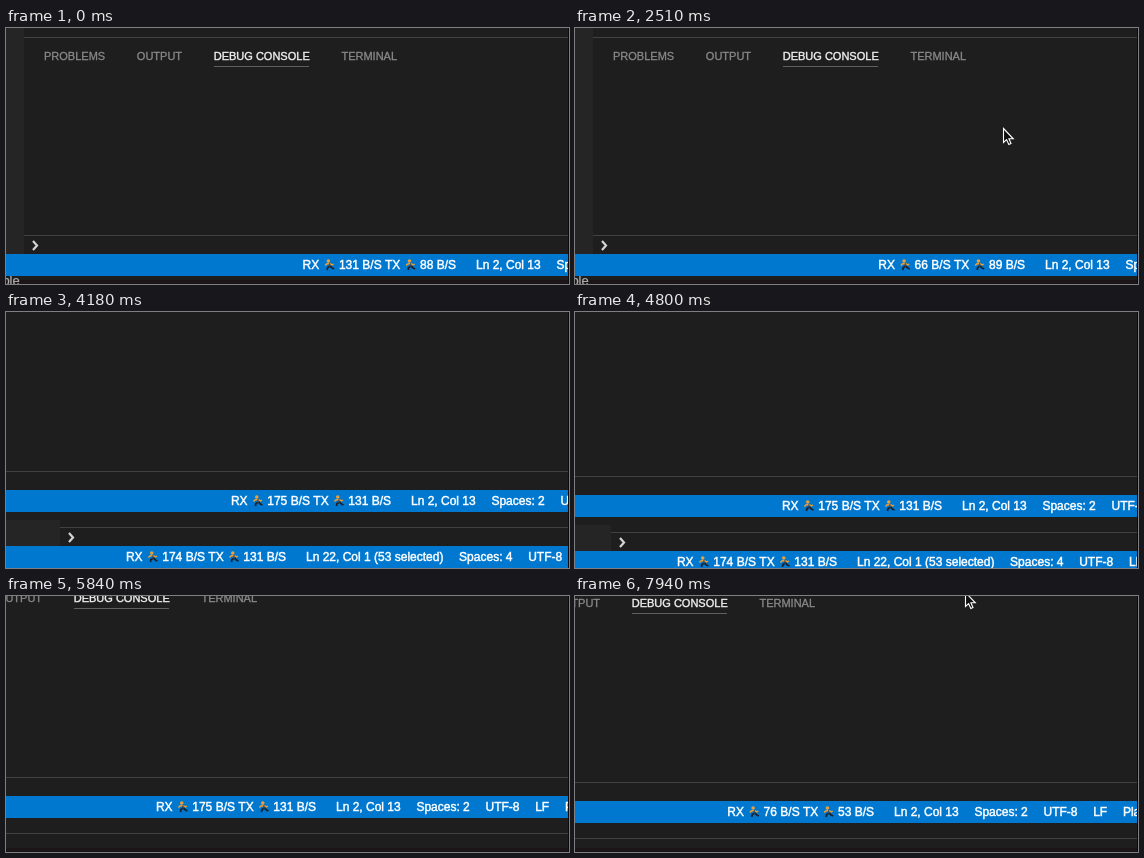
An HTML page with a canvas for the animation above (8 s loop, 563x256 px).

```html
<!DOCTYPE html>
<html lang="en">
<head>
<meta charset="utf-8">
<title>Network status bar</title>
<style>
  html, body { margin: 0; width: 100%; height: 100%; overflow: hidden; background: #1e1e1e; }
  canvas { display: block; }
</style>
</head>
<body>
<canvas id="stage" width="563" height="256"></canvas>
<script>
const ctx = document.getElementById('stage').getContext('2d');
const W = 563, H = 256, LOOP = 8000;
const TICK = 208.5;     // the picture advances in ticks
const REFRESH = 15;     // ticks between two traffic readings
const EMOJI = 13;       // advance width of the runner
const BG = '#1e1e1e', SIDE = '#252526', RULE = '#414141', BLUE = '#0078d0';

// Camera path: tick, x, y
const PAN = [
  [18.85, 0, 0], [20, -65, -48], [22, -80, -55], [23, -83, -43],
  [28, -140, -26], [34, -148, -24], [36, -151, -21]
];
const TRAFFIC = [[131, 88], [66, 89], [175, 131], [76, 53]];
const POINTER = { 12: [428, 100], 13: [401, 86], 38: [390, -4] };

function camera(tick) {
  const next = PAN.findIndex(key => key[0] > tick);
  if (next < 1) return (next ? PAN[PAN.length - 1] : PAN[0]).slice(1);
  const a = PAN[next - 1], b = PAN[next];
  const p = (tick - a[0]) / (b[0] - a[0]);
  return [1, 2].map(i => Math.round(a[i] + (b[i] - a[i]) * p));
}

function rect(x, y, w, h, color) {
  ctx.fillStyle = color;
  ctx.fillRect(x, y, w, h);
}

function setFont(size) {
  ctx.font = `${size}px "Liberation Sans", Arial, sans-serif`;
}

// Returns the x where the text ends
function text(str, x, y, size, color, weight) {
  setFont(size);
  ctx.fillStyle = ctx.strokeStyle = color;
  ctx.lineWidth = weight;
  ctx.fillText(str, x, y);
  ctx.strokeText(str, x, y);
  return x + ctx.measureText(str).width;
}

const label = (str, x, y) => text(str, x, y, 12, '#fff', 0.45);

function line(color, width, ...points) {
  ctx.beginPath();
  for (let i = 0; i < points.length; i += 2) ctx.lineTo(points[i], points[i + 1]);
  ctx.strokeStyle = color;
  ctx.lineWidth = width;
  ctx.stroke();
}

function runner(x, y) {
  ctx.save();
  ctx.translate(x, y);
  line('#1c222c', 1.8, 7, 7, 4.5, 8.5, 4, 11);
  line('#1c222c', 1.8, 7, 7, 9, 9, 11, 10);
  line('#2f4a66', 2.4, 6, 4, 7.2, 7.4);
  line('#eea032', 1.4, 6, 4.5, 3.5, 5, 2, 6.5);
  line('#eea032', 1.4, 7, 4.5, 9, 6, 10.5, 5);
  ctx.beginPath();
  ctx.arc(5.3, 2, 1.8, 0, 7);
  ctx.fillStyle = '#e8a03a';
  ctx.fill();
  ctx.restore();
}

function traffic([rx, tx], right, y) {
  const parts = ['RX ', ` ${rx} B/S TX `, ` ${tx} B/S`];
  setFont(12);
  let x = right - 2 * EMOJI - ctx.measureText(parts.join('')).width;
  parts.forEach((part, i) => {
    if (i) {
      runner(x + 0.5, y - 10);
      x += EMOJI;
    }
    x = label(part, x, y);
  });
}

// Bottom part of an editor window: input row and status bar
function windowFoot(side, y, rates, right, items) {
  rect(side, y, 900, 1, RULE);
  line('#d4d4d4', 2.2, side + 9, y + 6, side + 13, y + 10.5, side + 9, y + 15);
  rect(-200, y + 19, 1200, 22, BLUE);
  traffic(rates, right, y + 34);
  let x = right + 20;
  for (const item of items) x = label(item, x, y + 34) + 15.7;
}

function tabs(x, y, active) {
  for (const name of ['PROBLEMS', 'OUTPUT', 'DEBUG CONSOLE', 'TERMINAL']) {
    const on = name === active;
    const end = text(name, x, y, 11, on ? '#f0f0f0' : '#8a8a8a', on ? 0.4 : 0.3);
    if (on) rect(Math.round(x), y + 6, 95, 1, '#606060');
    x = end + 31.7;
  }
}

function pointer(x, y) {
  ctx.save();
  ctx.translate(x, y);
  const outline = new Path2D('M.5 .5V14.5L3.6 11.6 5.8 16.5 8 15.5 5.9 10.8H10.3Z');
  ctx.fillStyle = '#111';
  ctx.fill(outline);
  ctx.strokeStyle = '#fff';
  ctx.lineWidth = 1.1;
  ctx.stroke(outline);
  ctx.restore();
}

function draw(now) {
  const tick = Math.floor(now % LOOP / TICK);
  const rates = TRAFFIC[Math.floor((tick + REFRESH - 1) / REFRESH)];

  rect(0, 0, W, H, BG);
  rect(0, 252, W, 4, '#1b1517');
  ctx.save();
  ctx.translate(...camera(tick));

  // Lower window
  rect(-200, 256, 319, 26, SIDE);
  text('Variable', -33, 257, 13, '#b0b0b0', 0.2);
  windowFoot(119, 263, [174, 131], 345, ['Ln 22, Col 1 (53 selected)', 'Spaces: 4', 'UTF-8', 'LF']);

  // Upper window
  rect(-200, 0, 218, 226, SIDE);
  rect(18, 9, 900, 1, RULE);
  tabs(38, 32, 'DEBUG CONSOLE');
  windowFoot(18, 207, rates, 450, ['Ln 2, Col 13', 'Spaces: 2', 'UTF-8', 'LF', 'Plain Text']);
  ctx.restore();

  rect(W - 1, 0, 1, H, '#0a0a0a');
  if (POINTER[tick]) pointer(...POINTER[tick]);
}

function frame() {
  draw(performance.now());
  requestAnimationFrame(frame);
}
frame();
</script>
</body>
</html>
```
